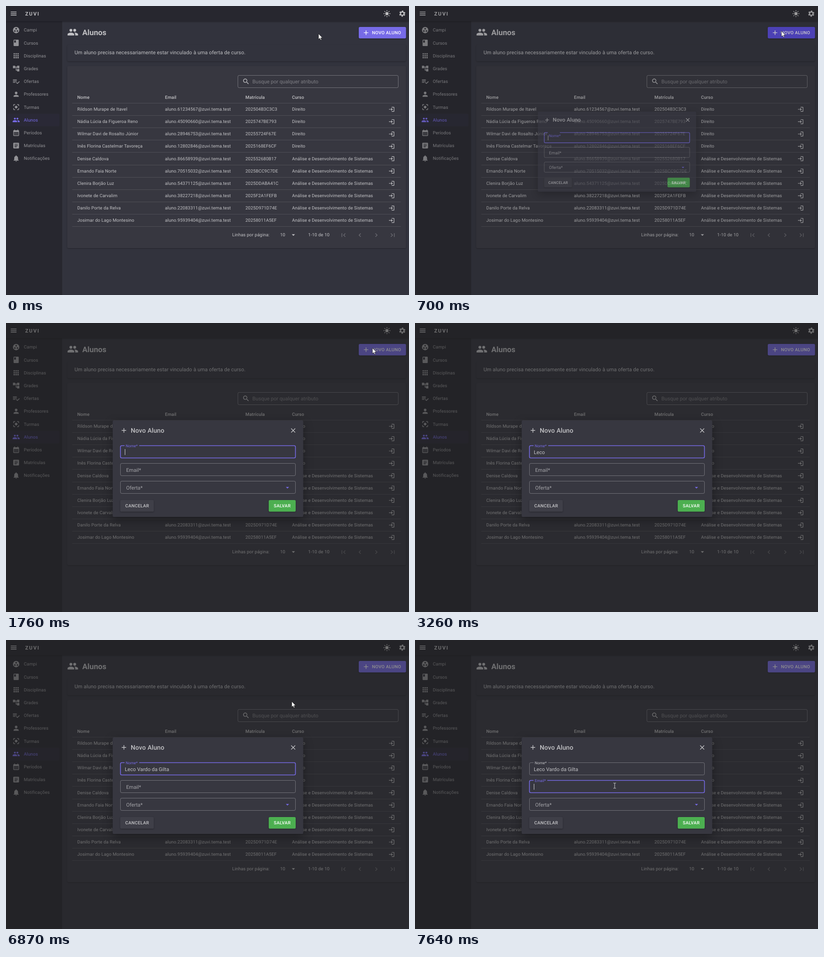
Animation, 882 px wide and 635 px high, one loop 8 s. Source, as an HTML page:

```html
<!DOCTYPE html>
<html lang="pt-BR">
<head>
<meta charset="utf-8">
<title>Alunos</title>
<style>
html, body { margin: 0; width: 100%; height: 100%; overflow: hidden; background: #32333d; }
svg { display: block; width: 882px; height: 635px; }
text {
  font: 400 9.8px Roboto, sans-serif;
  fill: rgba(255,255,255,.7);
  white-space: pre;
  text-rendering: geometricPrecision;
}
.body2 { letter-spacing: .0107em; }
.body1 { font-size: 11.2px; letter-spacing: .007em; }
.input { font-size: 11.2px; }
.head { font-weight: 500; letter-spacing: .0107em; }
.btn { font-weight: 500; letter-spacing: .0286em; }
.h5 { font-size: 16.8px; font-weight: 600; }
.h6 { font-size: 14px; font-weight: 500; letter-spacing: .0075em; }
.brand { font-size: 11.2px; font-weight: 700; letter-spacing: 1.75px; }
.white { fill: #fff; }
.card { fill: #373740; filter: drop-shadow(0 1px 1px rgba(0,0,0,.3)); }
.card.plain { fill: #32333d; }
.raised { filter: drop-shadow(0 1.4px 1.4px rgba(0,0,0,.32)); }
.dialog { fill: #373740; filter: drop-shadow(0 7px 10px rgba(0,0,0,.35)); }
.outline { fill: none; stroke: rgba(255,255,255,.3); }
.outline.on { stroke: #776be7; stroke-width: 1.6; }
</style>
</head>
<body>
<svg id="stage" viewBox="0 0 882 635" xmlns="http://www.w3.org/2000/svg"></svg>
<script>
const PRIMARY = '#776be7', SOFT = 'rgba(255,255,255,.7)', MUTED = 'rgba(255,255,255,.5)', OFF = 'rgba(255,255,255,.27)';
const LOOP = 8000;

const ICON = {
  menu: 'M3 18h18v-2H3zm0-5h18v-2H3zm0-7v2h18V6z',
  group: 'M12 2a10 10 0 100 20 10 10 0 000-20zM8 17.5a2.5 2.5 0 110-5 2.5 2.5 0 010 5zM12 10.5a2.5 2.5 0 110-5 2.5 2.5 0 010 5zM16 17.5a2.5 2.5 0 110-5 2.5 2.5 0 010 5z',
  book: 'M18 2H6a2 2 0 00-2 2v16a2 2 0 002 2h12a2 2 0 002-2V4a2 2 0 00-2-2zM6 4h5v8l-2.5-1.5L6 12z',
  apps: [4, 10, 16].map(x => [4, 10, 16].map(y => `M${x} ${y}h4v4h-4z`).join('')).join(''),
  tree: 'M22 11V3h-7v3H9V3H2v8h7V8h2v10h4v3h7v-8h-7v3h-2V8h2v3z',
  check: 'M14 10H2v2h12zm0-4H2v2h12zM2 16h8v-2H2zm19.5-4.5L23 13l-7 7-4.5-4.5L13 14l3 3z',
  person: 'M12 12a4 4 0 100-8 4 4 0 000 8zm0 2c-2.67 0-8 1.34-8 4v2h16v-2c0-2.66-5.33-4-8-4z',
  focus: 'M12 8a4 4 0 100 8 4 4 0 000-8zm-7 7H3v4a2 2 0 002 2h4v-2H5zM5 5h4V3H5a2 2 0 00-2 2v4h2zm14-2h-4v2h4v4h2V5a2 2 0 00-2-2zm0 16h-4v2h4a2 2 0 002-2v-4h-2z',
  people: 'M16 11a3 3 0 100-6 3 3 0 000 6zM8 11a3 3 0 100-6 3 3 0 000 6zm0 2c-2.33 0-7 1.17-7 3.5V19h14v-2.5C15 14.17 10.33 13 8 13zm8 0l-.97.05C16.2 13.9 17 15 17 16.5V19h6v-2.5c0-2.33-4.67-3.5-7-3.5z',
  calendar: 'M19 4h-1V2h-2v2H8V2H6v2H5a2 2 0 00-2 2v14a2 2 0 002 2h14a2 2 0 002-2V6a2 2 0 00-2-2zm0 16H5V10h14z'
    + [7, 11, 15].map(x => `M${x} 12h2v2h-2zm0 4h2v2h-2z`).join(''),
  article: 'M19 3H5a2 2 0 00-2 2v14a2 2 0 002 2h14a2 2 0 002-2V5a2 2 0 00-2-2zm-5 14H7v-2h7zm3-4H7v-2h10zm0-4H7V7h10z',
  bell: 'M12 22a2 2 0 002-2h-4a2 2 0 002 2zm6-6v-5c0-3.07-1.64-5.64-4.5-6.32V4a1.5 1.5 0 00-3 0v.68C7.63 5.36 6 7.92 6 11v5l-2 2v1h16v-1z',
  enter: 'M11 7L9.6 8.4l2.6 2.6H2v2h10.2l-2.6 2.6L11 17l5-5zm9 12h-8v2h8a2 2 0 002-2V5a2 2 0 00-2-2h-8v2h8z',
  search: 'M15.5 14h-.8l-.3-.3A6.5 6.5 0 109.5 16c1.6 0 3.1-.6 4.2-1.6l.3.3v.8l5 5 1.5-1.5zm-6 0a4.5 4.5 0 110-9 4.5 4.5 0 010 9z',
  plus: 'M19 13h-6v6h-2v-6H5v-2h6V5h2v6h6z',
  close: 'M19 6.4L17.6 5 12 10.6 6.4 5 5 6.4l5.6 5.6L5 17.6 6.4 19l5.6-5.6 5.6 5.6 1.4-1.4-5.6-5.6z',
  drop: 'M7 10l5 5 5-5z',
  prev: 'M15.4 7.4L14 6l-6 6 6 6 1.4-1.4-4.6-4.6z',
  next: 'M10 6L8.6 7.4l4.6 4.6-4.6 4.6L10 18l6-6z',
  first: 'M18.4 16.6L13.8 12l4.6-4.6L17 6l-6 6 6 6zM6 6h2v12H6z',
  last: 'M5.6 7.4l4.6 4.6-4.6 4.6L7 18l6-6-6-6zM16 6h2v12h-2z'
};

const MENU = [
  ['group', 'Campi'], ['book', 'Cursos'], ['apps', 'Disciplinas'], ['tree', 'Grades'],
  ['check', 'Ofertas'], ['person', 'Professores'], ['focus', 'Turmas'], ['people', 'Alunos'],
  ['calendar', 'Períodos'], ['article', 'Matrículas'], ['bell', 'Notificações']
];
const LAW = 'Direito', SYSTEMS = 'Análise e Desenvolvimento de Sistemas';
const STUDENTS = [
  ['Rildson Murape de Itavel', '202504B3C3C3'],
  ['Nádia Lúcia da Figueroa Reno', '2025747BE793'],
  ['Wilmar Davi de Rosalto Júnior', '20255724F67E'],
  ['Inês Florina Castelmar Tavoreça', '2025168EF6CF'],
  ['Denise Caldova', '202552680B17'],
  ['Ernando Faia Norte', '2025BCC9C7DE'],
  ['Clenira Borjão Luz', '2025DDABA41C'],
  ['Ivonete de Carvalim', '2025F2A1FEFB'],
  ['Danilo Porte da Relva', '2025D971D74E'],
  ['Josimar do Lago Montesino', '20258011A5EF']
];
const NEW_NAME = 'Leco Vardo da Gilta';
const KEYS = [1800, 1970, 2180, 2760, 3380, 3590, 3750, 3970, 4220, 4300, 4460, 4640, 4870, 5290, 5590, 5760, 5960, 6080, 6290];
const TRAIL = [[6710, 759, 87], [6790, 685, 108], [6870, 626, 134.5], [7000, 545, 195], [7150, 480, 260], [7300, 448, 305], [7420, 437, 320]];
const EMAIL_FOCUS = 7470;

// Markup helpers; text baselines sit on whole pixels
const text = (x, y, s, cls = 'body2', extra = '') => `<text x="${x}" y="${Math.round(y)}" class="${cls}" ${extra}>${s}</text>`;
const rect = (x, y, w, h, extra = '') => `<rect x="${x}" y="${y}" width="${w}" height="${h}" ${extra}/>`;
const place = (cx, cy, size = 16.8) => `transform="translate(${cx - size / 2} ${cy - size / 2}) scale(${size / 24})"`;
const icon = (name, cx, cy, fill = SOFT, size) => `<path d="${ICON[name]}" fill="${fill}" ${place(cx, cy, size)}/>`;
const field = (id, y) => rect(250.5, y, 383, 27, `id="${id}" rx="2.8" class="outline"`);

function appBar() {
  const rays = [0, 45, 90, 135, 180, 225, 270, 315]
    .map(a => `<path d="M12 2v2" transform="rotate(${a} 12 12)"/>`).join('');
  return rect(0, 0, 882, 33.6, 'fill="#27272f" class="raised"')
    + icon('menu', 16.7, 16.8) + text(42, 21, 'ZUVI', 'brand')
    + `<g ${place(833.7, 16.8)} stroke="${SOFT}" stroke-width="2" stroke-linecap="round">${rays}<circle cx="12" cy="12" r="5" fill="#c0c0c2" stroke="none"/></g>`
    + `<g ${place(867.3, 16.8)} fill="none" stroke="#bebec1"><circle cx="12" cy="12" r="5.4" stroke-width="3.6"/>
       <circle cx="12" cy="12" r="8" stroke-width="3.2" stroke-dasharray="4.4 3.978" transform="rotate(14.25 12 12)"/></g>`;
}

function drawer() {
  return rect(0, 33, 123, 602, 'fill="#27272f"')
    + rect(3, 236.5, 114, 28, 'rx="2.8" fill="rgba(119,107,231,.04)"')
    + MENU.map(([name, label], i) => {
      const y = 52.9 + i * 28.2, color = label === 'Alunos' ? PRIMARY : MUTED;
      return icon(name, 22.2, y, color) + text(39, y + 3.4, label, 'body2', `style="fill:${color}"`);
    }).join('');
}

function table() {
  const line = y => rect(145, y, 719, 1, 'fill="rgba(255,255,255,.12)"');
  const cols = [156, 348, 524, 626];
  const head = ['Nome', 'Email', 'Matrícula', 'Curso'].map((s, i) => text(cols[i], 204, s, 'head')).join('');
  const rows = STUDENTS.map(([name, code], i) => {
    const y = 230 + i * 27.13;
    const id = 10000000 + (i * 73856093 + 51234567) % 90000000;
    const cells = [name, `aluno.${id}@zuvi.tema.test`, code, i < 4 ? LAW : SYSTEMS];
    return cells.map((s, k) => text(cols[k], y, s)).join('')
      + icon('enter', 844, y - 3, SOFT, 14) + line(Math.round(240 + i * 27.15));
  }).join('');
  return head + line(213) + rows;
}

function page() {
  return rect(0, 0, 882, 635, 'fill="#32333d"')
    + icon('people', 146.2, 57.5, SOFT, 25) + text(167, 64, 'Alunos', 'h5')
    + rect(772, 46, 103.5, 25.3, `id="add" rx="2.8" class="raised"`)
    + `<clipPath id="addClip">${rect(772, 46, 103.5, 25.3, 'rx="2.8"')}</clipPath>`
    + icon('plus', 788, 58.6, '#fff') + text(801, 62, 'NOVO ALUNO', 'btn white')
    + '<circle id="ripple" cx="802" cy="58" fill="#fff" clip-path="url(#addClip)"/>'
    + rect(134, 85, 741.5, 36.4, 'rx="2.8" class="card plain"')
    + text(150, 106, 'Um aluno precisa necessariamente estar vinculado à uma oferta de curso.', 'body1')
    + rect(134, 132, 741.5, 400, 'rx="2.8" class="card"')
    + rect(507.5, 152.5, 351, 27, 'rx="2.8" class="outline"')
    + icon('search', 525.3, 165.8) + text(539.3, 170, 'Busque por qualquer atributo', 'input', 'style="fill:rgba(255,255,255,.36)"')
    + table()
    + text(495, 506, 'Linhas por página:') + text(600, 506, '10') + icon('drop', 629, 502.8) + text(661.3, 506, '1-10 de 10')
    + ['first', 'prev', 'next', 'last'].map((n, i) => icon(n, 738.6 + i * 35.9, 503.4, OFF)).join('')
    + drawer() + appBar();
}

function dialog() {
  const mute = 'style="fill:rgba(255,255,255,.55)"';
  return rect(233.5, 214, 417, 212, 'rx="2.8" class="dialog"')
    + icon('plus', 258.1, 236) + text(273, 241, 'Novo Aluno', 'h6') + icon('close', 628.5, 236.2)
    + field('nameBox', 269.5) + rect(259.5, 267.5, 32, 4, 'fill="#373740"')
    + '<text id="nameLabel">Nome*</text>' + text(260, 288, '', 'input', 'id="typed"')
    + field('mailBox', 308.5) + rect(259.5, 306.5, 30, 4, 'id="mailNotch" fill="#373740"')
    + '<text id="mailLabel">Email*</text>'
    + field('offerBox', 347.5) + text(263, 366, 'Oferta*', 'input', mute) + icon('drop', 616, 361.6, PRIMARY)
    + rect(250, 389, 73.5, 25.5, 'rx="2.8" fill="#3f3f48" class="raised"') + text(261, 405, 'CANCELAR', 'btn')
    + rect(575, 389, 59, 25.5, 'rx="2.8" fill="#4caf50" class="raised"') + text(586, 405, 'SALVAR', 'btn white')
    + rect(0, 0, 1, 13, `id="caret" fill="#d0d0d3"`);
}

const stage = document.getElementById('stage');
stage.innerHTML = page()
  + rect(0, 0, 882, 635, 'id="shade" fill="#212121"')
  + `<g id="modal">${dialog()}</g>`
  + `<path id="arrow" d="M0 0V12.3L2.8 9.7 4.7 14 6.6 13.2 4.8 9H8.6Z" fill="#fff" stroke="#111" stroke-width=".7"/>`
  + `<path id="beam" d="M-2.8-5.7H-1Q0-5.7 0-4.8 0-5.7 1-5.7H2.8M0-4.8V4.8M-2.8 5.7H-1Q0 5.7 0 4.8 0 5.7 1 5.7H2.8" fill="none" stroke="#d2d2d4"/>`;

const el = {};
stage.querySelectorAll('[id]').forEach(n => el[n.id] = n);
const set = (n, attrs) => { for (const k in attrs) n.setAttribute(k, attrs[k]); };
const show = (n, on) => n.setAttribute('visibility', on ? 'visible' : 'hidden');

// Timing helpers
const ramp = (t, start, dur) => Math.min(1, Math.max(0, (t - start) / dur));
const sineOut = p => Math.sin(p * Math.PI / 2);
const cubicOut = p => 1 - (1 - p) ** 3;
const smooth = p => p * p * (3 - 2 * p);
const mix = (a, b, p) => a + (b - a) * p;

function pointer(t) {
  if (t < 1800) {
    const p = smooth(ramp(t, 50, 370));
    return [mix(684, 802, p), mix(61, 55, p)];
  }
  if (t < TRAIL[0][0]) return null;
  const i = TRAIL.findIndex(k => k[0] > t);
  if (i < 0) return TRAIL.at(-1).slice(1);
  const [t0, x0, y0] = TRAIL[i - 1], [t1, x1, y1] = TRAIL[i];
  const p = (t - t0) / (t1 - t0);
  return [mix(x0, x1, p), mix(y0, y1, p)];
}

function floatLabel(n, top, p, fill) {
  set(n, { x: mix(263, 262, p), y: top + mix(18.5, 3.5, p) });
  n.style.fontSize = mix(11.2, 8.4, p) + 'px';
  n.style.fill = fill;
}

function render(t) {
  const open = t >= 700, inMail = t >= EMAIL_FOCUS;

  const hover = smooth(ramp(t, 190, 200)) - smooth(ramp(t, 700, 240));
  el.add.setAttribute('fill', `rgb(${mix(119, 90, hover)},${mix(107, 75, hover)},${mix(231, 226, hover)})`);
  const wave = smooth(ramp(t, 660, 280));
  set(el.ripple, { r: open ? 53 * wave : 0, opacity: .25 * (1 - ramp(t, 680, 900)) });

  el.shade.setAttribute('opacity', open ? .5 * sineOut(ramp(t, 655, 150)) : 0);
  const grow = sineOut(ramp(t, 655, 100)), s = mix(.5, 1, grow);
  show(el.modal, open);
  set(el.modal, { opacity: grow, transform: `translate(442 320) scale(${s}) translate(-442 -320)` });

  el.nameBox.classList.toggle('on', !inMail);
  el.mailBox.classList.toggle('on', inMail);
  el.mailNotch.setAttribute('opacity', inMail ? 1 : 0);
  floatLabel(el.nameLabel, 269.5, cubicOut(ramp(t, 665, 200)), inMail ? SOFT : PRIMARY);
  floatLabel(el.mailLabel, 308.5, cubicOut(ramp(t, EMAIL_FOCUS, 180)), inMail ? PRIMARY : 'rgba(255,255,255,.55)');

  const count = KEYS.filter(k => k <= t).length;
  const typed = NEW_NAME.slice(0, count);
  if (el.typed.textContent !== typed) el.typed.textContent = typed;
  const since = inMail ? EMAIL_FOCUS : count ? KEYS[count - 1] : 720;
  const width = inMail || !count ? 0 : el.typed.getComputedTextLength();
  set(el.caret, { x: Math.round(260 + width), y: inMail ? 316 : 277, opacity: open && (t - since) % 1000 < 500 ? 1 : 0 });

  const at = pointer(t);
  const overField = at && t > 1800 && [269.5, 308.5].some(y => at[1] > y && at[1] < y + 27);
  show(el.arrow, at && !overField);
  show(el.beam, overField);
  if (at) set(overField ? el.beam : el.arrow, { transform: `translate(${at})` });
}

const start = performance.now();
function tick() {
  render((performance.now() - start) % LOOP);
  requestAnimationFrame(tick);
}
tick();
</script>
</body>
</html>
```
